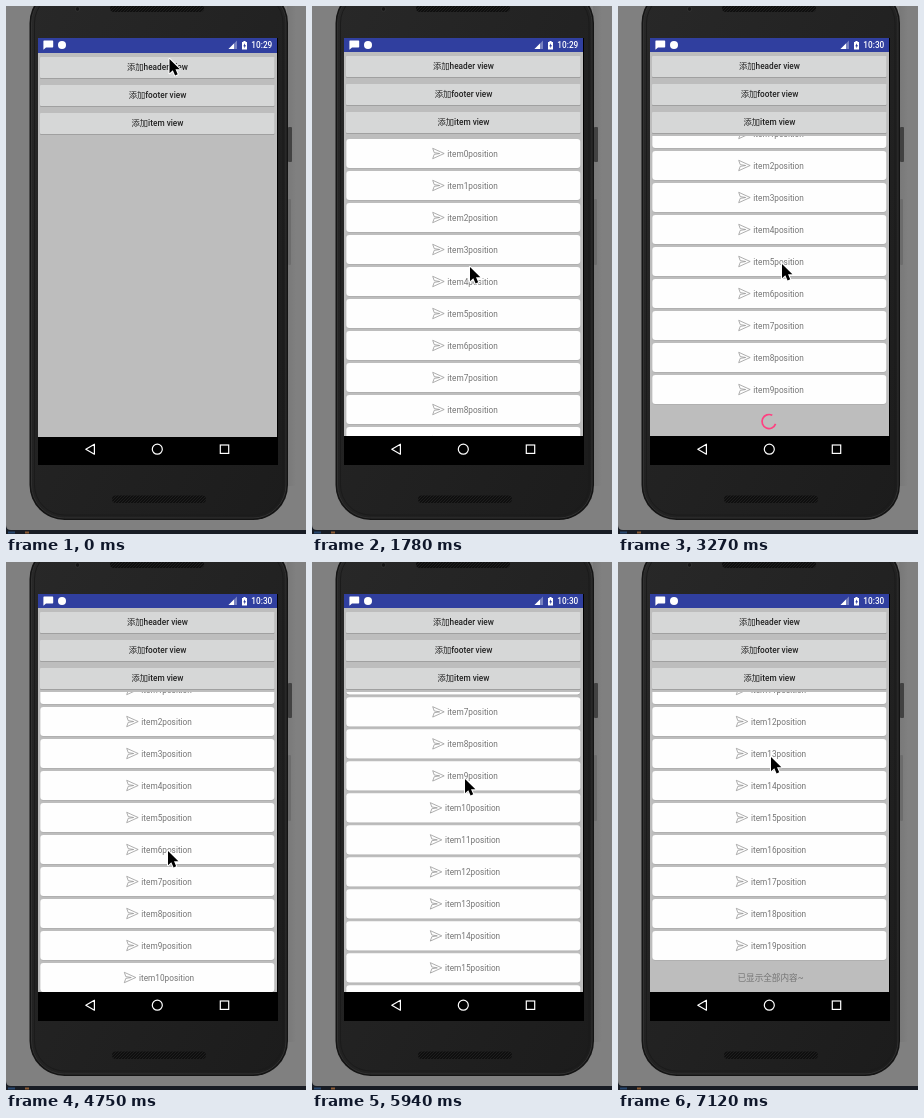
Animation of 300x528 px, one loop 8000 ms. Source, as an HTML page:

```html
<!DOCTYPE html>
<html lang="zh">
<head>
<meta charset="utf-8">
<title>List with footer loading</title>
<style>
  html, body { margin: 0; width: 100%; height: 100%; overflow: hidden; background: #808080; }
  svg { display: block; width: 100%; height: 100%; }
  text { font-family: Roboto, "Noto Sans CJK SC", "Noto Sans CJK", sans-serif; font-size: 8.25px; text-anchor: middle; }
  .label { font-weight: 500; fill: #222; }
  .item { fill: #757575; }
  .line { fill: none; stroke: #fff; stroke-width: 1.2; }
</style>
</head>
<body>
<svg viewBox="0 0 300 528">
  <defs>
    <linearGradient id="face" x1="0" y1="0" x2="1" y2="1">
      <stop offset="0" stop-color="#282828"/>
      <stop offset="1" stop-color="#1c1c1c"/>
    </linearGradient>
    <linearGradient id="shade" x1="0" x2="1">
      <stop offset="0" stop-color="#787878"/>
      <stop offset="1" stop-color="#808080"/>
    </linearGradient>
    <pattern id="mesh" width="3" height="3" patternUnits="userSpaceOnUse">
      <rect width="3" height="3" fill="#0f0f0f"/>
      <path d="M0 3L3 0" stroke="#222" stroke-width=".8"/>
    </pattern>
    <clipPath id="screen"><rect x="32" y="32" width="239" height="399"/></clipPath>
    <clipPath id="view"><rect x="32" y="130" width="239" height="300"/></clipPath>
    <path id="plane" d="M.5 -5.2L12 0L.5 5.2L2 .9L7.5 0L2 -.9Z"
      fill="none" stroke="#949494" stroke-width=".75" stroke-linejoin="round"/>
  </defs>

  <!-- desktop and phone body -->
  <rect width="300" height="528" fill="#181c24"/>
  <path d="M2 526.5h7" stroke="#27466e" stroke-width="2"/>
  <path d="M19 526.5h4" stroke="#8a5a35" stroke-width="2"/>
  <path d="M0 0H300V524H5Q0 524 0 519Z" fill="#808080"/>
  <rect x="281" width="9" height="480" fill="url(#shade)"/>
  <rect x="282" y="121" width="4" height="35" rx="1" fill="#424242"/>
  <rect x="282" y="193" width="3" height="66" rx="1" fill="#6c6c6c"/>
  <rect x="23.5" y="-18" width="258.5" height="532" rx="35" fill="#141414"/>
  <rect x="25.5" y="-16" width="254.5" height="528" rx="33" fill="url(#face)" stroke="#303030"/>
  <rect x="28.5" y="-13" width="248.5" height="522" rx="30" fill="none" stroke="#1b1b1b"/>
  <rect x="104" y="-2" width="94" height="8" rx="4" fill="url(#mesh)"/>
  <circle cx="71.5" cy="3" r="2.3" fill="#151515" stroke="#363636" stroke-width=".8"/>
  <rect x="106" y="489.5" width="94" height="7.5" rx="3.7" fill="url(#mesh)"/>

  <!-- screen -->
  <rect x="32" y="32" width="240" height="427" fill="#000"/>
  <g clip-path="url(#screen)">
    <g id="page">
      <rect x="32" y="30" width="239" height="400" fill="#bdbdbd"/>
      <g id="buttons"></g>
      <rect x="32" y="30" width="239" height="16" fill="#303f9f"/>
    </g>
  </g>
  <g fill="#fff">
    <path d="M38 34.5h8.5q.7 0 .7.7v5.6q0 .7-.7.7H40l-2.6 2.2V35.2q0-.7.6-.7z"/>
    <circle cx="56" cy="39" r="4"/>
    <path d="M222.5 43L231 34.5V43Z" opacity=".35"/>
    <path d="M222.5 43L228 37.5V43Z"/>
    <path d="M236 36h1.4v-1h2.2v1h1.4v7.5h-5z"/>
    <path d="M239 37.2l-1.8 3h1.1v2l1.8-3h-1.1z" fill="#303f9f"/>
    <text id="clock" x="255.8" y="42.2" font-weight="500"></text>
  </g>
  <g id="list" clip-path="url(#view)"></g>
  <g class="line">
    <path d="M79.8 443.2L88.4 438.2V448.2Z" stroke-linejoin="round"/>
    <circle cx="151.3" cy="443.2" r="5"/>
    <rect x="214.3" y="439" width="8.4" height="8.4"/>
  </g>

  <path id="cursor" d="M0 0V14.2L3.3 11.2L5.6 16.4L8.2 15.3L6 10.2H10.4Z"
    stroke="#fff" stroke-width="2" stroke-linejoin="round" paint-order="stroke"/>
</svg>
<script>
  // Motion is sampled on a fixed step, like a slow screen capture.
  const LOOP = 8000, STEP = 148.4, ROW = 32, TOP = 147.5, PAGE = 10;
  const $ = id => document.getElementById(id);

  function add(parent, tag, attrs, text) {
    const el = document.createElementNS("http://www.w3.org/2000/svg", tag);
    for (const k in attrs) el.setAttribute(k, attrs[k]);
    if (text) el.textContent = text;
    return parent.appendChild(el);
  }
  const show = (el, on) => el.setAttribute("visibility", on ? "visible" : "hidden");
  const move = (el, x, y) => el.setAttribute("transform", `translate(${x} ${y})`);

  ["header", "footer", "item"].forEach((name, i) => {
    const y = 50 + i * 28, box = { x: 34, width: 234.5, height: 21, rx: 1 };
    add($("buttons"), "rect", { ...box, y: y + 1, fill: "#a0a0a0" });
    add($("buttons"), "rect", { ...box, y, fill: "#d6d7d7" });
    add($("buttons"), "text", { class: "label", x: 151.5, y: y + 13.4 }, `添加${name} view`);
  });

  const rows = Array.from({ length: 2 * PAGE }, (_, i) => {
    const g = add($("list"), "g", {});
    const box = { x: 34.3, width: 234, height: 29.2, rx: 3 };
    add(g, "rect", { ...box, y: -13.9, fill: "#acacac" });
    add(g, "rect", { ...box, y: -14.6, fill: "#fefefe" });
    add(g, "use", { href: "#plane", x: i < PAGE ? 120.2 : 117.8 });
    add(g, "text", { class: "item", x: 160.6, y: 3.1 }, `item${i}position`);
    return g;
  });
  const spinner = add($("list"), "path", { fill: "none", stroke: "#ff4081", "stroke-width": 1.7 });
  const ending = add($("list"), "text", { class: "item", x: 152.5, y: 3.1, style: "font-size:8.6px" }, "已显示全部内容~");

  const clamp = u => Math.min(1, Math.max(0, u));
  const smooth = u => u * u * (3 - 2 * u);
  const fling = u => 1 - (1 - u) ** 3;

  // Eases from the value so far to `to` between steps a and b.
  const glide = (k, from, moves) => moves.reduce(
    (v, [a, b, to, ease = smooth]) => v + (to - v) * ease(clamp((k - a) / (b - a))), from);

  const pointerX = k => glide(k, 163.5, [[0, 6, 158], [16, 19, 164], [22, 23, 162], [35, 40, 153]]);
  const pointerY = k => glide(k, 53, [
    [0, 6, 261], [16, 19, 310], [19, 22, 258], [22, 23, 289], [35, 37, 308], [37, 40, 217], [41, 46, 301], [46, 48, 195]
  ]);
  const scroll = k => glide(k, 0, [[19, 22, 52], [37, 43.6, 254.5, fling], [46, 48, 372]]);

  // Material spinner: the head runs ahead, then the tail catches up.
  function arc(time) {
    const turn = (time - 3265) / 1333 + .5, u = turn - Math.floor(turn);
    const base = -25 + (time - 3265) * 720 / 6665 + 90 * u;
    const tail = base + 270 * smooth(clamp(2 * u - 1));
    const head = base + 270 * smooth(clamp(2 * u)) + 8;
    const point = deg => {
      const a = deg * Math.PI / 180;
      return `${(7 * Math.cos(a)).toFixed(2)} ${(7 * Math.sin(a)).toFixed(2)}`;
    };
    return `M${point(tail)}A7 7 0 ${head - tail > 180 ? 1 : 0} 1 ${point(head)}`;
  }

  function draw(t) {
    const k = Math.floor((t + 12) / STEP);
    const loaded = k >= 12, more = k >= 32;
    const s = scroll(k), rowY = i => TOP + i * ROW - s;

    move($("page"), 0, k < 1 ? 1 : 0);
    $("clock").textContent = k < 15 ? "10:29" : "10:30";
    rows.forEach((g, i) => {
      move(g, 0, rowY(i));
      show(g, loaded && (more || i < PAGE));
    });
    move(spinner, 151, rowY(PAGE));
    spinner.setAttribute("d", arc(k * STEP));
    show(spinner, loaded && !more);
    move(ending, 0, rowY(2 * PAGE));
    show(ending, more);
    move($("cursor"), pointerX(k), pointerY(k));
  }

  const start = performance.now();
  function tick() {
    draw((performance.now() - start) % LOOP);
    requestAnimationFrame(tick);
  }
  tick();
</script>
</body>
</html>
```
